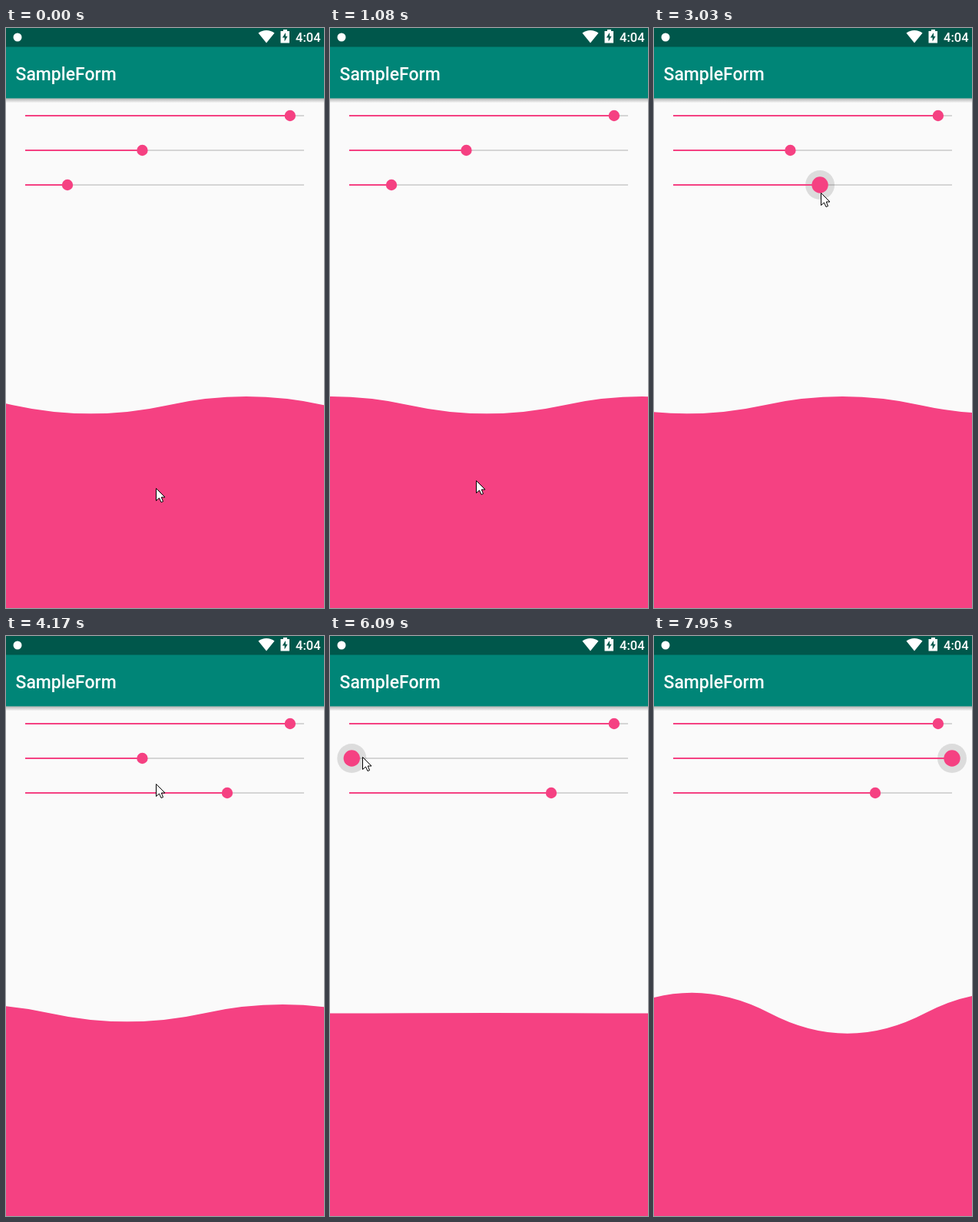
Animation of 414 by 754 pixels, one loop 8000 ms. Source, as an HTML page with a canvas:

```html
<!DOCTYPE html>
<html lang="en">
<head>
<meta charset="utf-8">
<title>Wave view</title>
<style>
html, body { margin: 0; width: 100%; height: 100%; overflow: hidden; background: #fafafa; }
canvas { display: block; width: 414px; height: 754px; }
</style>
</head>
<body>
<canvas id="stage"></canvas>
<script>
const W = 414, H = 754, LOOP = 8000;
const PINK = '#f54182', DARK = '#00574b', TEAL = '#008577';
const LEFT = 25, RIGHT = 388, SPAN = RIGHT - LEFT;
const GRAB = 2210, DROP = 3465;

const canvas = document.getElementById('stage');
const ctx = canvas.getContext('2d');
const dpr = window.devicePixelRatio || 1;
canvas.width = W * dpr;
canvas.height = H * dpr;
ctx.scale(dpr, dpr);

// 0 before `from`, 1 after `to`, linear between
const ramp = (t, from, to) => Math.min(1, Math.max(0, (t - from) / (to - from)));

// Thumb positions as fractions of the track
const speedAt = t => 0.1515 + 0.573 * ramp(t, GRAB, DROP);
const ampAt = t => 0.42 * (1 - ramp(t, 4750, 5850)) + ramp(t, 6078, 7500);

// Stops of the pointer: time, x, y
const stops = [
  [0, 195, 598], [1080, 190, 588], [2040, 82, 211], [GRAB, 81, 214], [DROP, 289, 214],
  [4170, 195, 192], [4750, 178, 159], [5850, 28, 158], [6090, 42, 157], [7500, 424, 160]
];

function pointerAt(t) {
  let [, x, y] = stops[0];
  for (let i = 1; i < stops.length; i++) {
    const a = stops[i - 1], b = stops[i], k = ramp(t, a[0], b[0]);
    x += (b[1] - a[1]) * k;
    y += (b[2] - a[2]) * k;
  }
  return [x, y];
}

function disc(x, y, r, fill) {
  ctx.fillStyle = fill;
  ctx.beginPath();
  ctx.arc(x, y, r, 0, Math.PI * 2);
  ctx.fill();
}

function rect(x, y, w, h, fill) {
  ctx.fillStyle = fill;
  ctx.fillRect(x, y, w, h);
}

function shape(path, x, y, fill, stroke) {
  const p = new Path2D(path);
  ctx.save();
  ctx.translate(x, y);
  ctx.fillStyle = fill;
  ctx.fill(p);
  if (stroke) {
    ctx.strokeStyle = stroke;
    ctx.stroke(p);
  }
  ctx.restore();
}

function text(str, x, y, size) {
  ctx.font = `500 ${size}px Roboto, sans-serif`;
  ctx.fillStyle = '#fff';
  ctx.fillText(str, x, y);
}

function drawBars() {
  const bottom = 91.5;
  rect(0, 0, W, bottom, TEAL);
  rect(0, 0, W, 24.5, DARK);
  const shade = ctx.createLinearGradient(0, bottom, 0, bottom + 6);
  shade.addColorStop(0, 'rgba(0,0,0,.28)');
  shade.addColorStop(1, 'rgba(0,0,0,0)');
  rect(0, bottom, W, 6, shade);

  disc(15, 12, 5.5, '#fff');
  text('SampleForm', 12.5, 68, 23);
  text('4:04', 377, 18, 16.5);

  // Wi-Fi fan, battery, bolt
  shape('M0 16.5L-10.5 3.5Q-6 0 0 0Q6 0 10.5 3.5Z', 339, 3, '#fff');
  rect(361, 2, 5, 3, '#fff');
  rect(357.5, 4, 11.5, 15.5, '#fff');
  shape('M1 0L-3.2 6.6H-.4V11.4L3.6 4.8H1Z', 363, 6, DARK);
}

function drawSlider(value, y, press) {
  const x = LEFT + SPAN * value;
  rect(LEFT, y - 1, SPAN, 2, '#d5d5d5');
  if (press > 0) disc(x, y, 10 + 9 * press, `rgba(0,0,0,${0.12 * press})`);
  rect(LEFT, y - 1, x - LEFT, 2, PINK);
  disc(x, y, 7.2 + 3.5 * press, PINK);
}

// The cycle lengthens with the speed slider; its clock restarts at the grab
function drawWave(t, amp, speed) {
  const half = 202.5, base = 490.2, lift = 53 * amp;
  const period = 298 + 3822 * speed;
  const phase = (t < GRAB ? 0.521 + t / period : (t - GRAB) / period) % 1;
  let x = half * (2 * phase - 3);
  ctx.fillStyle = PINK;
  ctx.beginPath();
  ctx.moveTo(x, H);
  ctx.lineTo(x, base);
  for (let i = 0; i < 6; i++, x += half) {
    ctx.quadraticCurveTo(x + half / 2, base + (i % 2 ? -lift : lift), x + half, base);
  }
  ctx.lineTo(x, H);
  ctx.fill();
}

function drawPointer(x, y) {
  shape('M0 0V16L4 12.5L6.5 18L9 17L6.8 11.5H11.5Z',
    Math.round(x) + 0.5, Math.round(y) + 0.5, '#fff', '#000');
}

function draw(t) {
  const amp = ampAt(t), speed = speedAt(t);
  rect(0, 0, W, H, '#fafafa');
  drawWave(t, amp, speed);
  drawBars();
  drawSlider(0.95, 114, 0);
  drawSlider(amp, 159, ramp(t, 4690, 4820));
  drawSlider(speed, 204, ramp(t, GRAB - 30, GRAB + 100) - ramp(t, DROP, DROP + 140));
  drawPointer(...pointerAt(t));
}

const start = performance.now();
function tick() {
  draw((performance.now() - start) % LOOP);
  requestAnimationFrame(tick);
}
tick();
</script>
</body>
</html>
```
